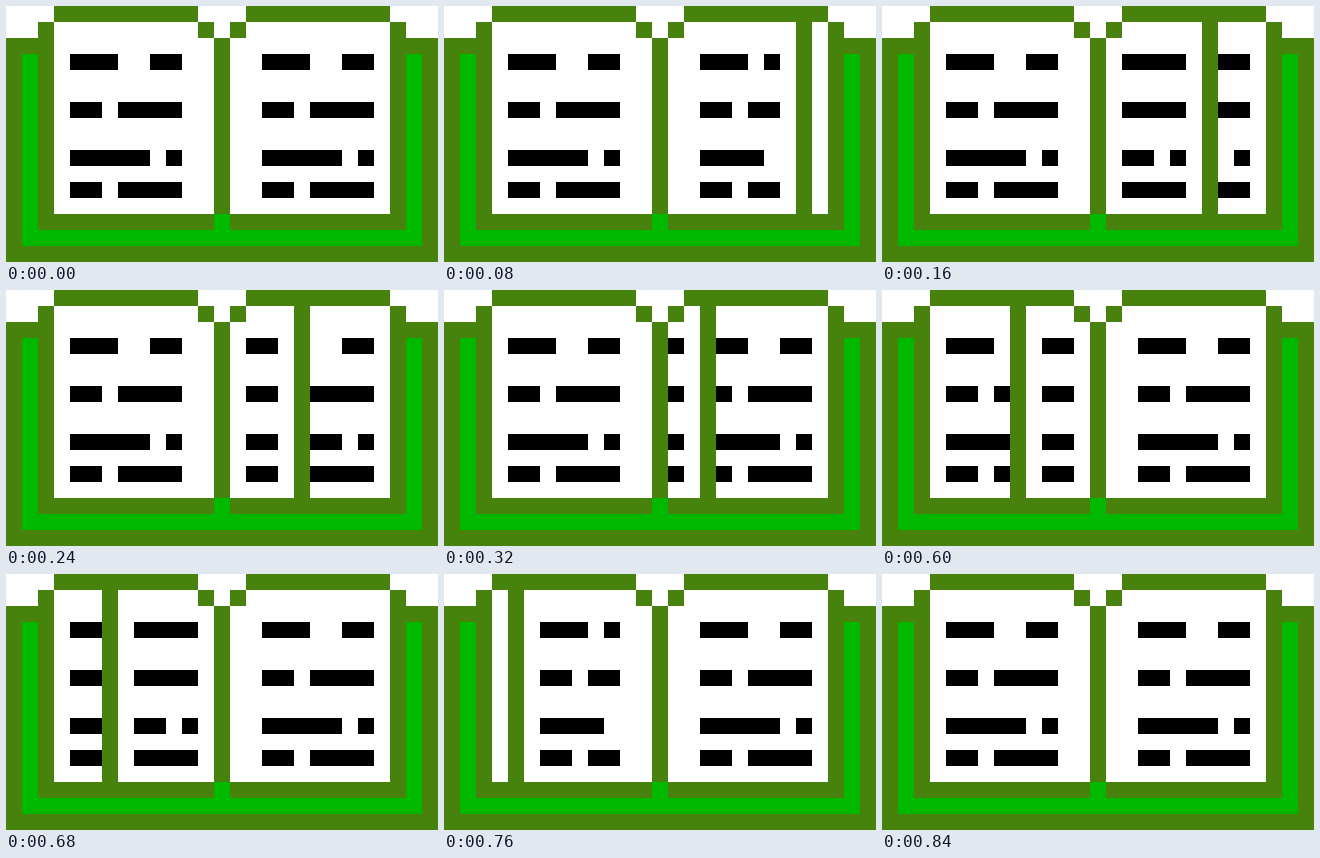
Write an HTML page without scripts that moves like this. It is 432 px wide and 256 px high and loops after 0.88 s.

```html
<!DOCTYPE html>
<html lang="en">
<head>
<meta charset="utf-8">
<title>Turning page</title>
<style>
  html, body { margin: 0; width: 100%; height: 100%; overflow: hidden; background: #fff; }
  svg { display: block; width: 100%; height: 100%; shape-rendering: crispEdges; }
  .edge { fill: #46820c; }
  .cover { fill: #00b800; }
  .text { fill: none; stroke: #000; }
  .leaf { stroke: #fff; stroke-width: 11; }

  /* Each pose of the turning leaf holds one 40 ms tick out of 22. */
  .turn g {
    animation: tick 880ms step-end infinite;
    animation-delay: calc(var(--i) * 40ms - 881ms);
  }
  @keyframes tick {
    0% { visibility: visible; }
    4.54545%, 100% { visibility: hidden; }
  }
</style>
</head>
<body>
<svg viewBox="0 0 27 16">
  <defs>
    <!-- Four lines of print, set 1 to 7 cells wide -->
    <path id="t7" class="text" d="M0 3.5h3m2 0h2M0 6.5h2m1 0h4M0 9.5h5m1 0h1M0 11.5h2m1 0h4"/>
    <path id="t6" class="text" d="M0 3.5h3m1 0h2M0 6.5h2m1 0h3M0 9.5h4m1 0h1M0 11.5h2m1 0h3"/>
    <path id="t5" class="text" d="M0 3.5h3m1 0h1M0 6.5h2m1 0h2M0 9.5h4M0 11.5h2m1 0h2"/>
    <path id="t4" class="text" d="M0 3.5h4M0 6.5h4M0 9.5h2m1 0h1M0 11.5h4"/>
    <path id="t3" class="text" d="M0 3.5h3M0 6.5h3M0 9.5h3M0 11.5h3"/>
    <path id="t2" class="text" d="M0 3.5h2M0 6.5h2M0 9.5h2M0 11.5h2"/>
    <path id="t1" class="text" d="M0 3.5h1M0 6.5h1M0 9.5h1M0 11.5h1"/>
    <path id="bar" class="edge" d="M0 1h1v12h-1z"/>
  </defs>

  <!-- Open book -->
  <path class="edge" d="M0 2h2v-1h1v12h21v-12h1v1h2v14h-27z"/>
  <path class="cover" d="M1 3h1v11h11v-1h1v1h11v-11h1v12h-25z"/>
  <path class="edge" d="M3 0h9v1h-9zM15 0h9v1h-9zM12 1h1v1h-1zM14 1h1v1h-1zM13 2h1v11h-1z"/>
  <use href="#t7" x="4"/>
  <use href="#t7" x="16"/>

  <g class="turn">
    <!-- Right page folds towards the spine -->
    <g style="--i:1"><path class="leaf" d="M14 7.5h9"/><use href="#t6" x="16"/><use href="#bar" x="23"/></g>
    <g style="--i:2"><path class="leaf" d="M14 7.5h8"/><use href="#t5" x="16"/><use href="#bar" x="22"/></g>
    <g style="--i:3"><path class="leaf" d="M14 7.5h7"/><use href="#t5" x="15"/><use href="#bar" x="21"/></g>
    <g style="--i:4"><path class="leaf" d="M14 7.5h6"/><use href="#t4" x="15"/><use href="#bar" x="20"/></g>
    <g style="--i:5"><path class="leaf" d="M14 7.5h5"/><use href="#t3" x="15"/><use href="#bar" x="19"/></g>
    <g style="--i:6"><path class="leaf" d="M14 7.5h4"/><use href="#t2" x="15"/><use href="#bar" x="18"/></g>
    <g style="--i:7"><path class="leaf" d="M14 7.5h3"/><use href="#t1" x="15"/><use href="#bar" x="17"/></g>
    <g style="--i:8"><path class="leaf" d="M14 7.5h2"/><use href="#t1" x="14"/><use href="#bar" x="16"/></g>
    <g style="--i:9"><path class="leaf" d="M14 7.5h1"/><use href="#bar" x="15"/></g>
    <g style="--i:10"><use href="#bar" x="14"/></g>

    <!-- Left page unfolds from the spine -->
    <g style="--i:11"><use href="#bar" x="12"/></g>
    <g style="--i:12"><path class="leaf" d="M13 7.5h-1"/><use href="#bar" x="11"/></g>
    <g style="--i:13"><path class="leaf" d="M13 7.5h-2"/><use href="#t1" x="12"/><use href="#bar" x="10"/></g>
    <g style="--i:14"><path class="leaf" d="M13 7.5h-3"/><use href="#t1" x="11"/><use href="#bar" x="9"/></g>
    <g style="--i:15"><path class="leaf" d="M13 7.5h-4"/><use href="#t2" x="10"/><use href="#bar" x="8"/></g>
    <g style="--i:16"><path class="leaf" d="M13 7.5h-5"/><use href="#t3" x="9"/><use href="#bar" x="7"/></g>
    <g style="--i:17"><path class="leaf" d="M13 7.5h-6"/><use href="#t4" x="8"/><use href="#bar" x="6"/></g>
    <g style="--i:18"><path class="leaf" d="M13 7.5h-7"/><use href="#t5" x="7"/><use href="#bar" x="5"/></g>
    <g style="--i:19"><path class="leaf" d="M13 7.5h-8"/><use href="#t5" x="6"/><use href="#bar" x="4"/></g>
    <g style="--i:20"><path class="leaf" d="M13 7.5h-9"/><use href="#t6" x="5"/><use href="#bar" x="3"/></g>
  </g>
</svg>
</body>
</html>
```
